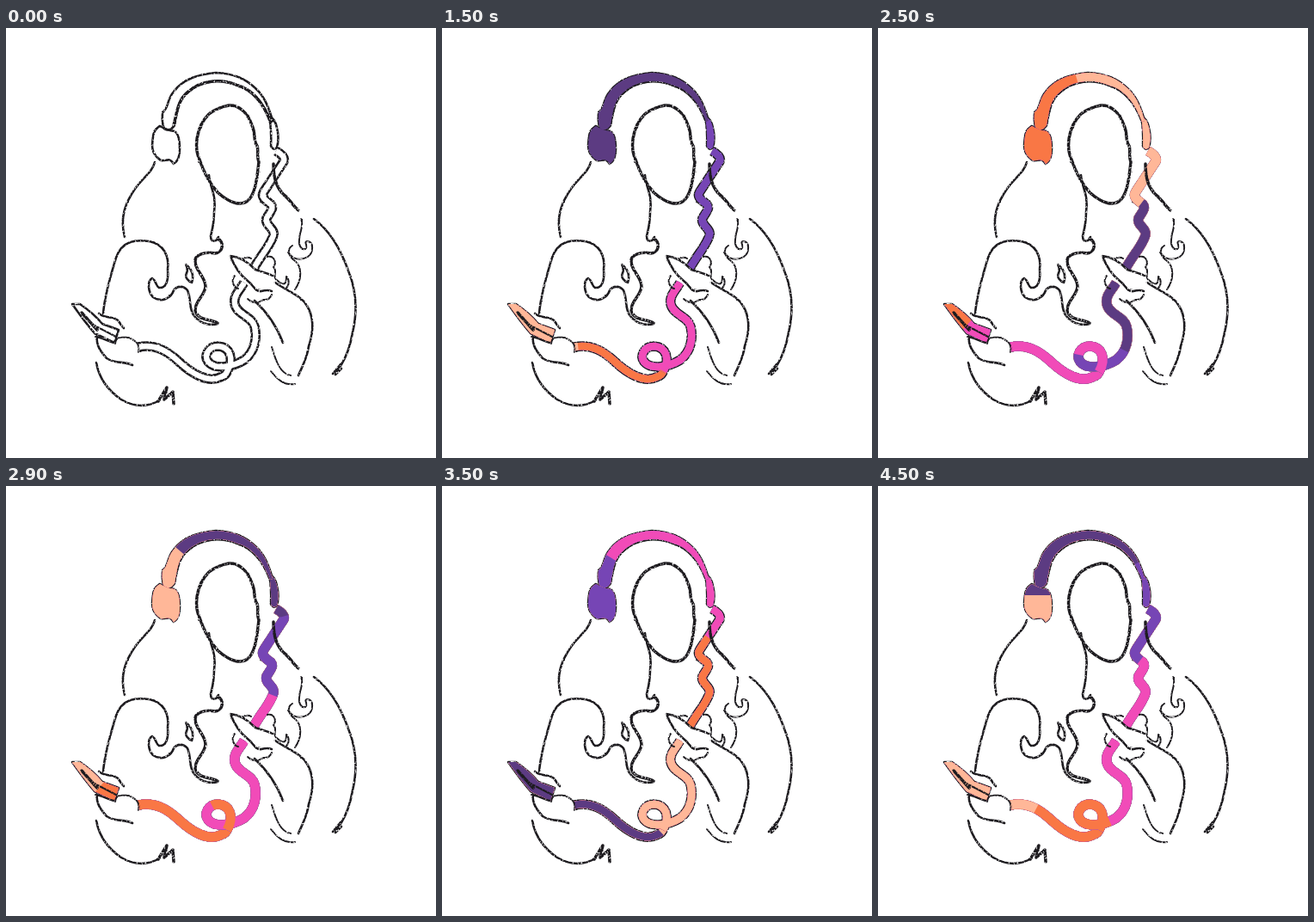
Animation, 500 px wide and 500 px high, one loop 4600 ms. Source, as an HTML page:

```html
<!DOCTYPE html>
<html lang="en">
<head>
<meta charset="utf-8">
<title>Listening</title>
<style>
  html, body { margin: 0; width: 100%; height: 100%; overflow: hidden; background: #fff; }
  svg { display: block; width: 100vw; height: 100vh; }
  path { fill: none; stroke-linejoin: round; }
  .ink { stroke: #1d1b1f; stroke-width: 2.6; stroke-linecap: round; }
  .ink .thick { stroke-width: 3.5; }
  .ink .thin { stroke-width: 2; }
  .ink .tube { stroke-width: 11.6; stroke-linecap: butt; }
  #hollow path { stroke: #fff; stroke-width: 6.4; }
  #paint { --tube: 8.6px; }
  #paint.wide { --tube: 11px; }
  #paint .tube { stroke-width: var(--tube); }
  #paint .shape { stroke-width: 70; }
  #thumb { fill: #fff; }
</style>
</head>
<body>
<svg viewBox="0 0 500 500">
  <defs>
    <filter id="charcoal" filterUnits="userSpaceOnUse" x="0" y="0" width="500" height="500" color-interpolation-filters="sRGB">
      <feTurbulence type="fractalNoise" baseFrequency=".15" numOctaves="2" seed="4" result="wobble"/>
      <feDisplacementMap in="SourceGraphic" in2="wobble" scale="1.6" xChannelSelector="R" yChannelSelector="G" result="rough"/>
      <feTurbulence type="fractalNoise" baseFrequency=".5" numOctaves="2" seed="9"/>
      <feColorMatrix values="0 0 0 0 0  0 0 0 0 0  0 0 0 0 0  4 0 0 0 -.85" result="grain"/>
      <feComposite in="rough" in2="grain" operator="in"/>
    </filter>
  </defs>

  <g id="outline" class="ink" filter="url(#charcoal)">
    <!-- inner edge of the headband -->
    <path class="thick" d="M195 113C199 99 199 84 212 74C227 61 249 58 270 67C287 72 299 87 308 109"/>
  </g>
  <g id="hollow"></g>
  <g id="paint"></g>

  <!-- holding thumb, covering the cable -->
  <path id="thumb" d="M261 265C272 267 284 273 290 281C298 284 305 285 310 288L309 305C304 312 296 314 288 306C279 297 268 287 261 265Z"/>

  <g class="ink" filter="url(#charcoal)">
    <!-- face and hair -->
    <path class="thick" d="M236 100C220 116 219 140 225 153C231 171 237 181 246 191C259 203 274 209 283 199C291 189 292 172 294 156C291 149 294 142 292 137C287 131 291 124 286 113C281 98 270 89 259 90C249 92 241 96 236 100"/>
    <path d="M173 156C170 168 160 173 150 187C139 203 132 220 138 243"/>
    <path d="M236 171C237 186 245 193 242 214C242 227 240 234 238 242C238 249 244 250 247 243"/>
    <path class="thick" d="M246 245C254 248 253 261 243 262C232 260 219 263 220 272C221 284 232 289 232 301C230 313 220 317 220 328C223 341 237 338 246 343"/>
    <path d="M113 332C115 308 123 284 128 267C135 247 151 246 166 248C184 251 190 266 188 281C189 292 187 303 178 302C174 300 175 294 170 291C164 294 165 307 171 313C181 320 192 314 195 305C199 299 207 300 211 305C216 316 212 327 219 335C227 345 239 346 246 344"/>
    <path d="M209 275C216 280 219 288 216 296C213 295 207 290 210 285Q212 280 209 275"/>
    <path class="thick" d="M311 158C311 174 314 184 322 193C330 199 334 207 340 212"/>
    <path class="thin" d="M343 222C347 230 341 237 341 246C340 254 345 260 349 256C351 252 346 249 350 248C358 248 358 261 351 266C342 271 334 269 328 261"/>
    <path class="thin" d="M333 253C326 257 329 266 335 270C345 277 344 293 336 304"/>

    <!-- right arm and hand -->
    <path d="M358 222C376 235 389 257 398 282C407 304 409 329 403 354C400 372 396 382 389 393"/>
    <path d="M380 402L389 391L383 403L390 396"/>
    <path d="M261 265C272 266 283 274 290 281C298 284 305 285 310 288M261 265C266 279 272 287 281 294C289 300 289 307 297 306Q304 304 309 306"/>
    <path class="thin" d="M266 288C261 294 265 302 270 303M274 269Q280 265 285 268M304 266C312 264 315 273 311 278M311 278C317 284 308 289 316 294C322 299 326 300 326 289C330 293 329 300 326 302M281 315Q290 323 299 316Q306 317 309 310"/>
    <path d="M313 296C329 307 343 311 350 323C358 336 358 352 352 370C350 385 344 394 340 404"/>
    <path d="M289 317C304 331 315 347 322 366"/>
    <path class="thin" d="M309 371C314 388 319 402 331 404M308 399C315 408 323 416 336 414"/>

    <!-- left arm and hand -->
    <path class="thick" d="M88 331L106 351"/>
    <path d="M106 358C104 370 112 378 117 384C127 391 138 387 147 392M108 332C116 339 126 334 131 341Q134 346 137 349"/>
    <path class="thin" d="M103 346L128 359M104 359C112 360 119 365 126 366M127 367C128 357 137 360 143 360C150 364 156 366 154 377"/>
    <path d="M105 389C108 407 118 421 134 432C152 443 169 439 178 433"/>
    <path class="thick" d="M177 434L187 418L184 432L194 423L195 437"/>
  </g>
</svg>

<script>
const NS = 'http://www.w3.org/2000/svg';
const LOOP = 4600, STEP = 100, CYCLE = 1500;
const DARK = '#5c3b82', VIOLET = '#7645b5', PINK = '#f14bb8', ORANGE = '#f97745', PEACH = '#ffb798';

// Parts in flow order: distance at the start and end, centre line, optional shape.
const parts = [
  { from: 0, to: 70, line: 'M74 317L132 368',
    shape: 'M77 321L86 321Q101 331 112 344L131 351L126 366L103 355Q91 341 77 321Z' },
  { from: 70, to: 205, line: 'M154 371C174 367 188 376 201 388C216 402 235 413 249 406Q256 404 257 399' },
  { from: 205, to: 412, line: 'M257 400C266 384 260 371 247 370C235 370 230 381 235 388C243 398 264 394 277 386C290 376 292 360 289 347C286 335 269 334 266 321C264 311 272 305 277 296' },
  { from: 425, to: 615, line: 'M288 280C296 264 306 256 311 241C313 233 300 229 303 221C307 214 312 210 308 205C300 199 296 196 300 190L323 155Q325 149 314 143' },
  { from: 615, to: 645, line: 'M312 143L309 102',
    shape: 'M306 102Q313 106 315 116Q318 128 315 139Q310 143 308 137Q309 120 306 102Z' },
  { from: 645, to: 838, line: 'M308 112C300 79 274 57 246 57C216 58 190 82 189 120',
    shape: 'M307 109C299 87 287 72 270 67C249 58 227 61 212 74C199 84 199 99 196 113Q191 121 184 117Q181 112 182 98C189 94 187 83 195 74C207 58 225 54 244 52C264 53 278 58 291 71C300 79 306 93 310 108Z' },
  { from: 838, to: 900, line: 'M187 114L187 162',
    shape: 'M179 114C170 119 171 127 170 136C170 146 175 150 180 154C186 155 190 150 195 158C200 155 202 150 202 141C202 132 201 123 196 120Q187 119 179 114Z' }
];

// Colour fronts run along the parts: launch time in ms, speed in units per ms.
const opening = [
  { color: DARK, launch: 20, speed: .64 },
  { color: VIOLET, launch: 480, speed: .63 },
  { color: PINK, launch: 975, speed: .785 },
  { color: ORANGE, launch: 1210, speed: .71 },
  { color: PEACH, launch: 1390, speed: .68 }
];
const cycle = [
  { color: DARK, launch: 1695, speed: .655 },
  { color: VIOLET, launch: 2030, speed: .69 },
  { color: PINK, launch: 2020, speed: .54 },
  { color: ORANGE, launch: 2430, speed: .53 },
  { color: PEACH, launch: 2830, speed: .62 }
];
const fronts = [...opening, ...cycle, ...cycle.map(f => ({ ...f, launch: f.launch + CYCLE }))];

function add(parent, tag, attrs) {
  const el = document.createElementNS(NS, tag);
  for (const key in attrs) el.setAttribute(key, attrs[key]);
  return parent.appendChild(el);
}

const $ = id => document.getElementById(id);
const paint = $('paint');
const strokes = [];

parts.forEach(({ from, to, line, shape }, i) => {
  const span = to - from;
  const group = add(paint, 'g', {});
  if (shape) {
    add($('outline'), 'path', { d: shape });
    add(add(document.querySelector('defs'), 'clipPath', { id: 'clip' + i }), 'path', { d: shape });
    group.setAttribute('clip-path', `url(#clip${i})`);
  } else {
    add($('outline'), 'path', { d: line, class: 'tube' });
    add($('hollow'), 'path', { d: line });
  }
  for (const front of fronts) {
    const el = add(group, 'path', { d: line, stroke: front.color, pathLength: span, class: shape ? 'shape' : 'tube' });
    strokes.push({ el, front, from, span });
  }
});

function draw(t) {
  const phase = (t - 2000) % CYCLE;
  paint.classList.toggle('wide', phase >= 500 && phase < 1300);
  for (const { el, front, from, span } of strokes) {
    const run = (t - front.launch) * front.speed - from;
    el.style.display = run > 0 ? '' : 'none';
    if (run > 0) el.setAttribute('stroke-dasharray', `${Math.min(run, span + 1)} 2000`);
  }
}

const start = performance.now();
let shown = -1;
function tick() {
  const t = Math.floor((performance.now() - start) % LOOP / STEP) * STEP;
  if (t !== shown) draw(shown = t);
  requestAnimationFrame(tick);
}
tick();
</script>
</body>
</html>
```
